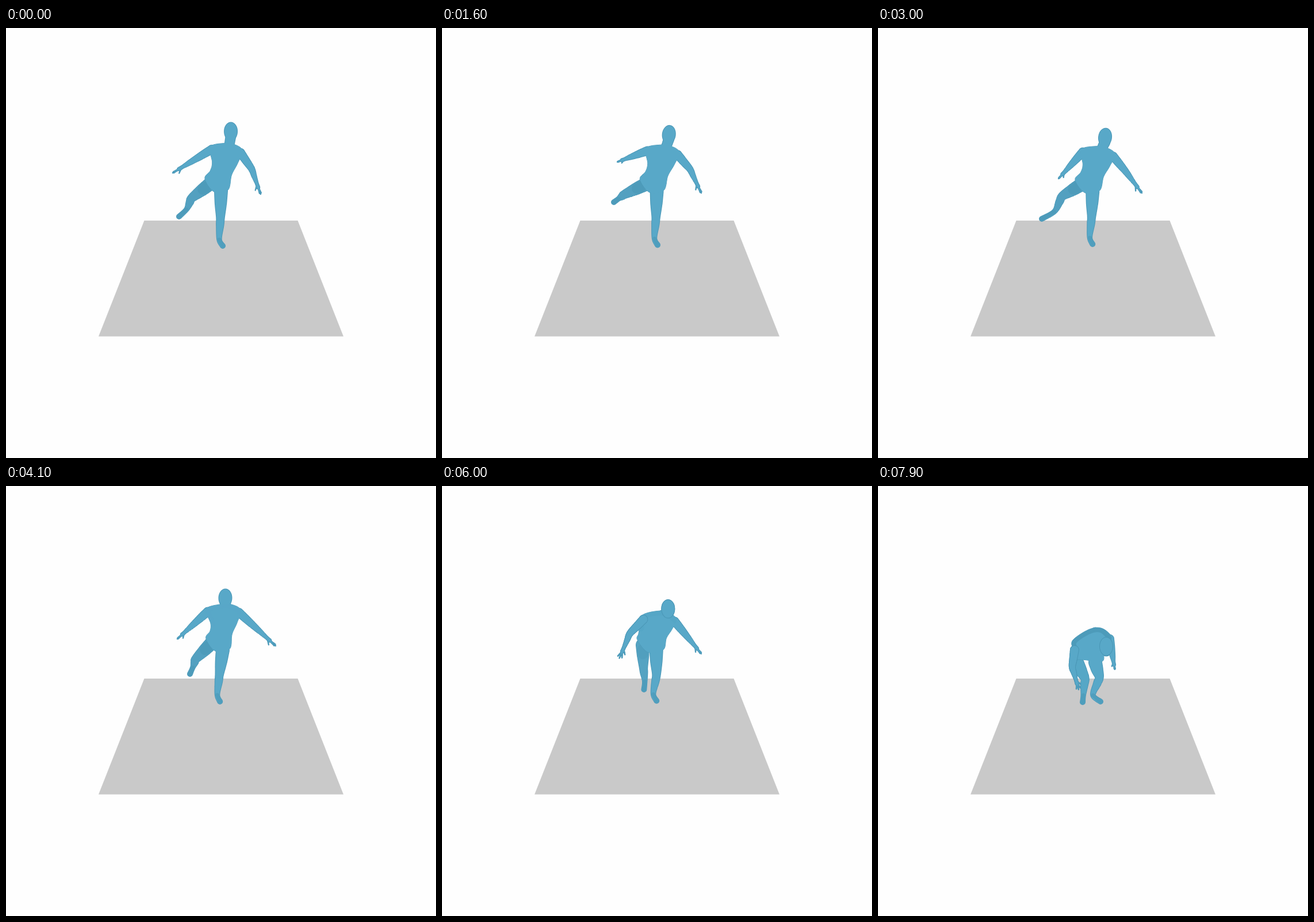
These frames come from a looping animation (748 px wide and 748 px high, 8 s). An HTML page with a canvas:

```html
<!DOCTYPE html>
<html lang="en">
<head>
<meta charset="utf-8">
<title>Balancing figure</title>
<style>
html, body { margin: 0; width: 100%; height: 100%; overflow: hidden; background: #fefefe; }
canvas { display: block; }
</style>
</head>
<body>
<canvas id="stage" width="748" height="748"></canvas>
<script>
const ctx = document.getElementById('stage').getContext('2d');
const LOOP = 8000, STEP = 100;
const SKIN = '#58a8c8', SHADE = '#529fbe', EDGE = '#4a97b6';

const mix = (a, b, k) => a + (b - a) * k;
const between = (p, q, k) => [mix(p[0], q[0], k), mix(p[1], q[1], k)];
const shift = ([x, y], dx, dy) => [x + dx, y + dy];
const swell = (t, mid, width) => Math.exp(-(((t - mid) / width) ** 2));
const ramp = (t, from, to) => {
  const k = Math.min(1, Math.max(0, (t - from) / (to - from)));
  return k * k * (3 - 2 * k);
};

// A point part of the way from p to q, pushed sideways by bow.
function bent(p, q, k, bow) {
  const dx = q[0] - p[0], dy = q[1] - p[1], len = Math.hypot(dx, dy);
  return shift(between(p, q, k), -dy / len * bow, dx / len * bow);
}

// A smooth path through [time, x, y] keys.
function travel(...keys) {
  const last = keys.length - 1;
  const slope = (i, c) => {
    const a = keys[Math.max(0, i - 1)], b = keys[Math.min(last, i + 1)];
    return (b[c] - a[c]) / (b[0] - a[0]);
  };
  return t => {
    let i = 0;
    while (i < last - 1 && t >= keys[i + 1][0]) i++;
    const a = keys[i], b = keys[i + 1], span = b[0] - a[0];
    const u = Math.min(1, (t - a[0]) / span), v = 1 - u;
    return [1, 2].map(c =>
      a[c] * v * v * (1 + 2 * u) + b[c] * u * u * (3 - 2 * u) +
      span * u * v * (slope(i, c) * v - slope(i + 1, c) * u));
  };
}

// Only the free hands and the lifted leg roam; near = left on screen.
const nearHand = travel([0, 290, 252], [1600, 305, 233], [3000, 314, 262],
  [4100, 298, 266], [5100, 329, 296], [6300, 306, 303], [7900, 349, 354]);
const farHand = travel([0, 443, 289], [1600, 451, 287], [3000, 459, 287],
  [4500, 470, 277], [5100, 455, 292], [6300, 448, 293], [7900, 412, 319]);
const nearKnee = travel([0, 323, 296], [2200, 317, 289], [4100, 330, 301],
  [6700, 357, 322], [7900, 360, 335]);
const nearToe = travel([0, 301, 328], [1600, 299, 303], [3000, 285, 332],
  [4100, 320, 327], [5100, 347, 331], [6700, 352, 371], [7900, 356, 376]);

// Every other joint drifts steadily, then drops as the body folds.
function pose(t) {
  const u = t / 7900, fold = u ** 6, settle = u ** 12;
  const sway = swell(t, 2300, 1100), twist = swell(t, 4100, 500);
  const bend = ramp(t, 4300, 5500), lifted = 1 - ramp(t, 5400, 6600);
  const drift = (x, y, dx, dy, fx, fy, f = fold) => [x + dx * u + fx * f, y + dy * u + fy * f];

  const head = shift(drift(391, 180, 2, 26, 4, 73), 5 * sway - 11 * twist, 0);
  const shoulderN = shift(drift(355, 207, -8, 12, -8, 49), 2 * sway - 3 * twist, 0);
  const shoulderF = shift(drift(411, 213, -4, 16, -1, 33), 4 * sway - twist, -6 * twist);
  const hipN = shift(drift(346, 262, -8, 6, 0, 32, settle), 6 * twist, 0);
  const hipF = shift(drift(386, 282, -2, 3, 6, 20, settle), 4 * twist, 0);

  const collar = k => shift(between(shoulderN, shoulderF, k), 0, -9 - 7 * fold);
  const flank = (k, inN) => shift(between(shoulderN, hipN, k), inN * (1 - bend), 0);
  const near = [
    shift(between(hipN, hipF, .5), -4, 13 * (1 - settle)), hipN,
    flank(.75, 7), flank(.48, 8), shoulderN, collar(.42)
  ];
  const far = [
    collar(.75), shoulderF, between(shoulderF, hipF, .33),
    shift(between(shoulderF, hipF, .62), -3, 0), hipF
  ];

  const arm = (shoulder, tip, bow) => {
    const elbow = bent(shoulder, tip, .42, bow);
    return [shoulder, elbow, between(elbow, tip, .55), tip];
  };
  const knee = nearKnee(t), toe = nearToe(t);
  const shin = Math.hypot(toe[0] - knee[0], toe[1] - knee[1]);
  return {
    head, near, far, bend, lifted, fold,
    tilt: .18 * sway,
    neckBase: shift(between(near[5], far[0], .5), 0, 6),
    armN: arm(shift(shoulderN, 3, 4 + 13 * fold), nearHand(t), 7 * bend),
    armF: arm(shift(shoulderF, -3, 4), farHand(t), -5 * (1 - ramp(t, 1600, 3500))),
    legN: [shift(hipN, 9, 9), knee,
      bent(knee, toe, mix(.7, .55, lifted), -.28 * Math.max(0, shin - 26) * lifted), toe],
    legF: [shift(hipF, -12, 2), drift(373, 330, -4, -4, 16, 7),
      drift(371, 368, -7, -9, 10, 5), drift(377, 379, -10, -8, 20, 4)]
  };
}

// Catmull-Rom samples through points of any dimension.
function curve(pts, closed, n = 12) {
  const out = [], len = pts.length;
  const at = i => closed ? pts[(i + len) % len] : pts[Math.min(len - 1, Math.max(0, i))];
  for (let i = 0; i < (closed ? len : len - 1); i++) {
    for (let k = 0; k < n; k++) {
      const u = k / n, [a, b, c, d] = [at(i - 1), at(i), at(i + 1), at(i + 2)];
      out.push(b.map((_, j) => b[j] + u / 2 * (c[j] - a[j] +
        u * (2 * a[j] - 5 * b[j] + 4 * c[j] - d[j] + u * (3 * (b[j] - c[j]) + d[j] - a[j])))));
    }
  }
  if (!closed) out.push(pts[len - 1]);
  return out;
}

// A soft tube along [x, y, radius] points.
function tube(pts, inset) {
  const path = new Path2D();
  for (const [x, y, r] of curve(pts)) {
    const size = Math.max(0.4, r - inset);
    path.moveTo(x + size, y);
    path.arc(x, y, size, 0, 7);
  }
  return path;
}

function outline(pts) {
  const path = new Path2D();
  curve(pts, true).forEach(([x, y]) => path.lineTo(x, y));
  path.closePath();
  return path;
}

function paint(path, color, alpha = 1) {
  ctx.globalAlpha = alpha;
  ctx.fillStyle = color;
  ctx.fill(path);
  ctx.globalAlpha = 1;
}

function tubes(list, color, inset, alpha) {
  for (const pts of list) paint(tube(pts, inset), color, alpha);
}

const legTubes = ([hip, knee, ankle, toe]) => [[
  [...hip, 12], [...between(hip, knee, .5), 10.5], [...knee, 7.8],
  [...between(knee, ankle, .35), 7.2], [...ankle, 4.8], [...toe, 5]
]];

function armTubes([shoulder, elbow, wrist, tip], spread, side) {
  const turn = Math.atan2(tip[1] - wrist[1], tip[0] - wrist[0]);
  const reach = Math.hypot(tip[0] - wrist[0], tip[1] - wrist[1]);
  const palm = between(wrist, tip, .4);
  const finger = (from, angle, len) => [
    [...from, 1.9],
    [from[0] + Math.cos(turn + angle) * len, from[1] + Math.sin(turn + angle) * len, 1.2]
  ];
  return [
    [[...shoulder, 8], [...between(shoulder, elbow, .5), 7.3], [...elbow, 6.1],
      [...between(elbow, wrist, .5), 5], [...wrist, 3.5], [...palm, 3.5]],
    ...[-1, 0, 1].map(k => finger(palm, k * spread, reach * (.6 - .08 * Math.abs(k)))),
    finger(between(wrist, tip, .15), side * .65, reach * .5)
  ];
}

function headPath([x, y], tilt, inset) {
  const path = new Path2D();
  path.ellipse(x, y, 12 - inset, 16.5 - inset, tilt, 0, 7);
  return path;
}

function draw(t) {
  const p = pose(t);
  const legN = legTubes(p.legN), legF = legTubes(p.legF);
  const armN = armTubes(p.armN, mix(.1, .38, ramp(t, 4400, 6300)), -1);
  const armF = armTubes(p.armF, .14, 1);
  const neck = [[[...shift(p.head, 0, 8), 9.5], [...p.neckBase, 9]]];
  const torso = outline([...p.near, ...p.far]);
  const [hip, knee] = p.legN;

  ctx.fillStyle = '#fefefe';
  ctx.fillRect(0, 0, 748, 748);
  paint(new Path2D('M240.5 335H507.5L587 536.5H161Z'), '#c9c9c9');

  // Lifted leg, darker while it is turned away
  tubes(legN, EDGE, 0);
  tubes(legN, SKIN, 1);
  tubes(legN, SHADE, 1, .2 + .6 * p.lifted);
  tubes([[[...between(hip, knee, .22), 10], [...between(hip, knee, .4), 9]]], EDGE, 0, .6 * p.lifted);

  const body = [...legF, ...armF, ...armN, ...neck];
  tubes(body, EDGE, 0);
  ctx.strokeStyle = EDGE;
  ctx.stroke(torso);
  paint(headPath(p.head, p.tilt, 0), EDGE);
  tubes(body, SKIN, 1);
  paint(torso, SKIN);
  paint(headPath(p.head, p.tilt, 1), SKIN);
  for (const [, , ankle, toe] of [p.legN, p.legF]) {
    tubes([[[...ankle, 3.2], [...toe, 3.6]]], EDGE, 0, .6);
  }

  // Shaded back, seen as the body folds forward
  ctx.save();
  ctx.clip(torso);
  const back = [...p.near.slice(3), ...p.far.slice(0, 2)];
  tubes([back.map(q => [...q, 8])], EDGE, 0, .75 * p.fold);
  ctx.restore();

  // Parts that come in front of the trunk
  tubes(armN, EDGE, 0, p.bend);
  tubes(armN, SKIN, 1, p.bend);
  paint(headPath(p.head, p.tilt, 0), EDGE, p.bend);
  paint(headPath(p.head, p.tilt, 1), SKIN, p.bend);
}

function tick() {
  draw(Math.floor(performance.now() % LOOP / STEP) * STEP);
  requestAnimationFrame(tick);
}
tick();
</script>
</body>
</html>
```
